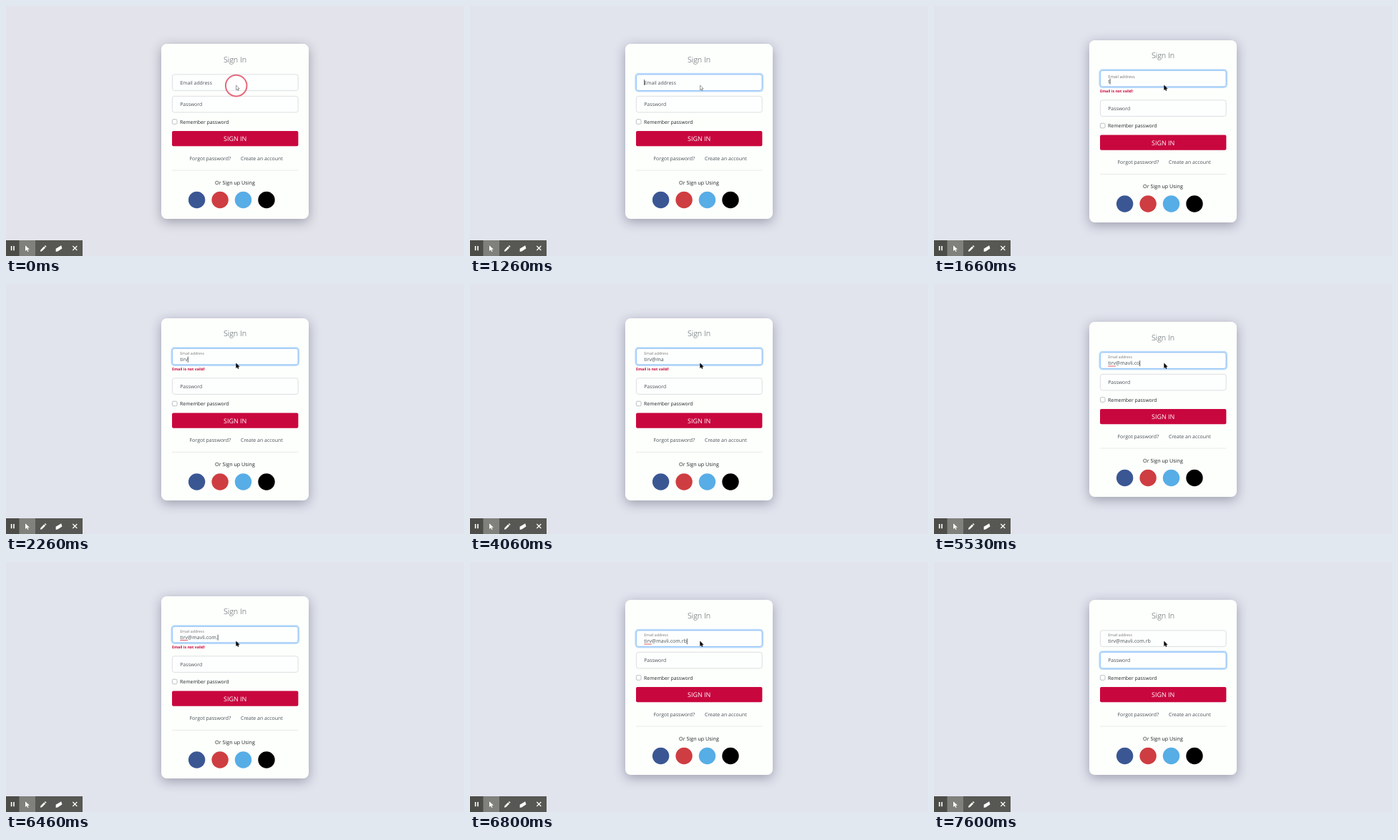
Animation, 640 px wide and 350 px high, one loop 8000 ms. Source, as an HTML page:

```html
<!DOCTYPE html>
<html lang="en">
<head>
<meta charset="utf-8">
<title>Sign In</title>
<style>
  html, body { margin: 0; width: 100%; height: 100%; overflow: hidden; background: #e1e4ed; }
  #card {
    position: absolute; left: 217px; width: 206px; border-radius: 7.5px;
    background: #fdfffc; box-shadow: 0 4px 16px rgba(24, 22, 50, .34);
  }
  svg { position: absolute; left: 0; top: 0; display: block; }
  text { font: 6.9px "Open Sans", "Noto Sans", sans-serif; fill: #495057; text-rendering: geometricPrecision; white-space: pre; }
  .mid { text-anchor: middle; }
  .box { fill: #fdfffe; stroke: #d3d7dc; stroke-width: .8; }
  .glow { fill: none; stroke: #007bff; stroke-opacity: .25; stroke-width: 1.6; }
  .edge { fill: none; stroke: #80bdff; stroke-width: .8; }
</style>
</head>
<body>
<div id="card"></div>
<svg width="640" height="350" viewBox="0 0 640 350">
  <g id="upper">
    <text class="mid" x="320" y="78.7" style="font-size:10.8px;font-weight:300">Sign In</text>
    <rect class="box" x="232.4" y="95.8" width="175.8" height="22.6" rx="3"/>
    <g id="emailFocus">
      <rect class="glow" x="231.2" y="94.6" width="178.2" height="25" rx="4"/>
      <rect class="edge" x="232.4" y="95.8" width="175.8" height="22.6" rx="3"/>
    </g>
    <text id="label">Email address</text>
    <text id="value" x="243.2" y="113.4" style="font-size:7.05px"></text>
    <path id="spell" stroke="#dc4a52" stroke-width=".9"/>
    <text id="error" x="232" y="126.8" style="font-size:5.26px;font-weight:700;fill:#c9073f">Email is not valid!</text>
  </g>
  <g id="lower">
    <rect class="box" x="232.4" y="126.3" width="175.8" height="22.6" rx="3"/>
    <g id="passFocus">
      <rect class="glow" x="231.2" y="125.1" width="178.2" height="25" rx="4"/>
      <rect class="edge" x="232.4" y="126.3" width="175.8" height="22.6" rx="3"/>
    </g>
    <text x="243.2" y="140.3">Password</text>
    <rect x="232.4" y="158.7" width="6.6" height="6.6" rx="1.6" fill="#fff" stroke="#a9b0b7" stroke-width=".8"/>
    <text x="243" y="164.7" style="fill:#212529">Remember password</text>
    <rect x="232" y="175" width="176.4" height="21.3" rx="2" fill="#c9073f"/>
    <text class="mid" x="320.2" y="189.3" style="font-size:9px;fill:#fff">SIGN IN</text>
    <text x="256.5" y="215.6" style="font-size:7.02px">Forgot password?</text>
    <text x="328" y="215.6" style="font-size:6.98px">Create an account</text>
    <path d="M232 230H408.4" stroke="#e4e6e6" stroke-width=".8"/>
    <text class="mid" x="320" y="249.5" style="font-size:7.2px;fill:#212529">Or Sign up Using</text>
    <circle cx="266.6" cy="271.5" r="11.7" fill="#3a5794"/>
    <circle cx="299.1" cy="271.5" r="11.7" fill="#ce3d41"/>
    <circle cx="331.5" cy="271.5" r="11.7" fill="#57ade6"/>
    <circle cx="364" cy="271.5" r="11.7" fill="#000"/>
  </g>
  <path id="caret" stroke="#30353a" stroke-width=".8"/>
  <circle id="ring" cx="321.7" cy="111.6" r="14.8" fill="#fff" fill-opacity=".35" stroke="#e56a7b" stroke-width="2"/>
  <path id="mouse" d="M321.6 111v6.6l1.5-1.4 1 2.3 1-.4-1-2.3h2.1z" stroke-width=".6" stroke-linejoin="round"/>

  <g id="toolbar">
    <rect y="328" width="107" height="22" fill="#575753"/>
    <rect y="328" width="18.5" height="22" fill="#4c4c49"/>
    <rect x="18.5" y="328" width="22.5" height="22" fill="#80807c"/>
    <path d="M7.6 336v6.2M11 336v6.2" stroke="#fff" stroke-width="1.6"/>
    <path d="M27 335.2v7.8l2-1.8 1.3 2.8 1.2-.6-1.3-2.7h2.7z" fill="#fff"/>
    <path d="M47.8 343.8l.6-2.4 4.8-4.8 1.8 1.8-4.8 4.8zM53.8 336l1-1 1.8 1.8-1 1z" fill="#fff"/>
    <path d="M69.6 344v-4.2l7.6-4.6 1.2 4.4-6.2 4z" fill="#fff"/>
    <path d="M93.3 336l6 6M99.3 336l-6 6" stroke="#fff" stroke-width="1.2"/>
  </g>
</svg>
<script>
const LOOP = 8000, SHIFT = 5.5;
const ADDRESS = "tirv@mavli.com.rb";
const KEYS = [1600, 1800, 2000, 2200, 2930, 3200, 3530, 4530, 4690, 4850,
              5060, 5230, 5400, 6130, 6400, 6600, 6800];
const INVALID = [[1600, 5400], [6400, 6800]];
const CARET = [[60, 730], [1200, 2660], [2930, 4060], [4530, 5800], [6130, 7060], [7060, 7600]];
const SPELL = [[5060, 7060]];
const CLICK = 60, TAB = 7060;

const el = {};
for (const node of document.querySelectorAll("[id]")) el[node.id] = node;

const within = (spans, t) => spans.some(([from, to]) => t >= from && t < to);
const ramp = (t, start, length) => Math.min(1, Math.max(0, (t - start) / length));
const ease = p => p * p * (3 - 2 * p);
const show = (node, on) => node.setAttribute("visibility", on ? "visible" : "hidden");
const moveY = (node, y) => node.setAttribute("transform", `translate(0 ${y})`);

const bodyMix = p => `rgb(${227 - 2 * p}, ${227 + p}, ${235 + 2 * p})`;

function draw(t) {
  const shift = within(INVALID, t) ? SHIFT : 0;
  el.card.style.top = 53 - shift + "px";
  el.card.style.height = 244.8 + 2 * shift + "px";
  moveY(el.upper, -shift);
  moveY(el.lower, shift);
  show(el.error, shift > 0);
  document.body.style.background = bodyMix(ramp(t, 0, 400));

  const typed = KEYS.filter(k => t >= k).length;
  el.value.textContent = ADDRESS.slice(0, typed);

  const float = ease(ramp(t, KEYS[0], 100));
  el.label.setAttribute("transform",
    `translate(243.2 ${109.6 - 5.4 * float}) scale(${1 - .245 * float})`);
  el.label.style.fill = float > .5 ? "#777" : "#495057";

  const leave = ease(ramp(t, TAB, 150));
  el.emailFocus.setAttribute("opacity", ease(ramp(t, CLICK, 150)) * (1 - leave));
  el.passFocus.setAttribute("opacity", leave);

  const width = typed ? el.value.getComputedTextLength() : 0;
  const inPass = t >= TAB;
  const x = inPass ? 243.6 : 243.6 + width;
  const y = inPass ? 133.6 : (typed ? 107.2 : 103) - shift;
  el.caret.setAttribute("d", `M${x} ${y}v8`);
  show(el.caret, within(CARET, t));

  show(el.spell, within(SPELL, t));
  if (typed >= 4) el.spell.setAttribute("d", `M243.2 115h${el.value.getSubStringLength(0, 4)}`);

  el.ring.setAttribute("opacity", 1 - ramp(t, CLICK, 300));
  const dark = t >= KEYS[0];
  el.mouse.setAttribute("fill", dark ? "#000" : "#fff");
  el.mouse.setAttribute("stroke", dark ? "#222" : "#555");
}

const begin = performance.now();
function tick() {
  draw((performance.now() - begin) % LOOP);
  requestAnimationFrame(tick);
}
tick();
</script>
</body>
</html>
```
